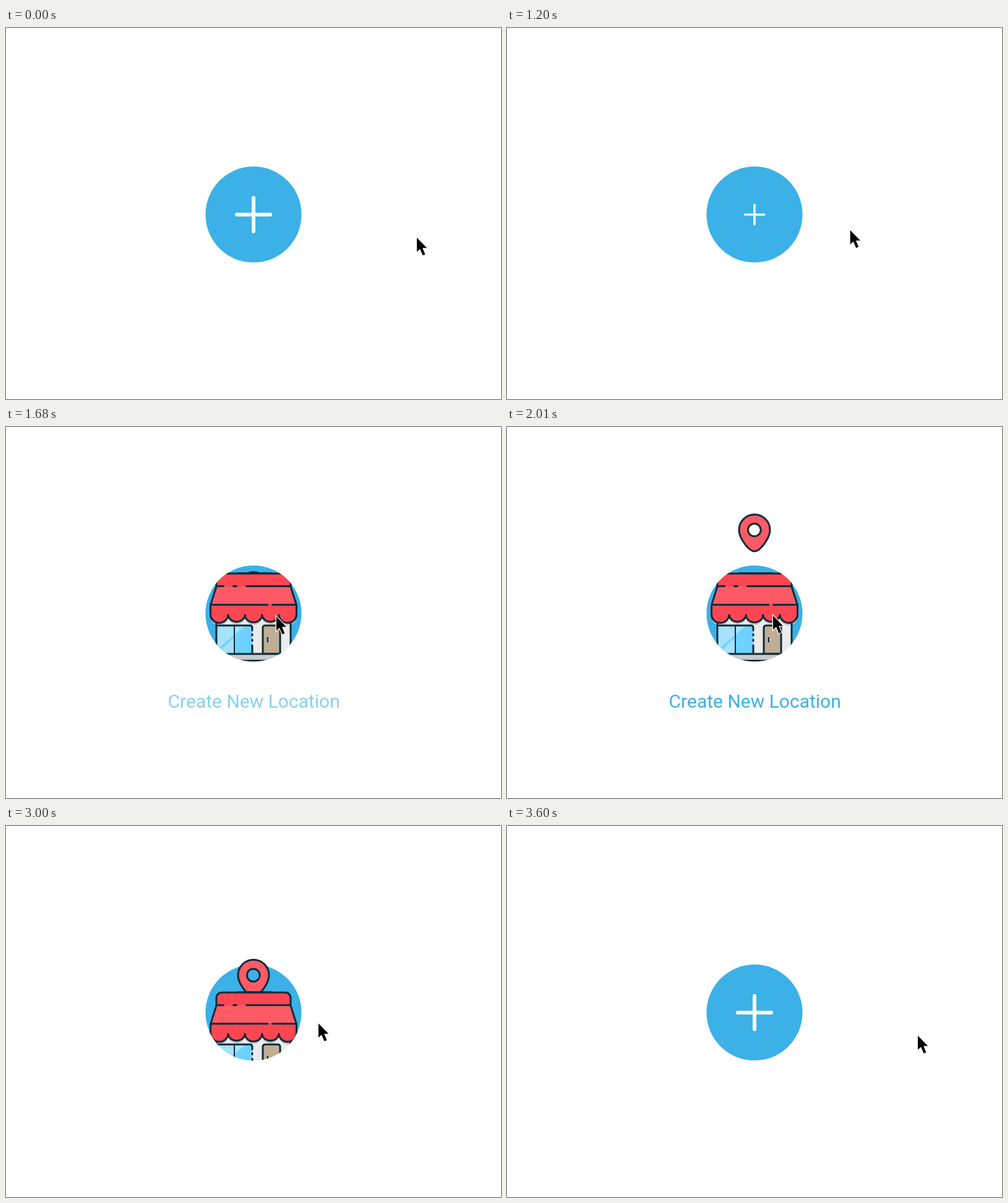
An HTML page for the animation above (4.5 s loop, 800 by 600 pixels).

```html
<!DOCTYPE html>
<html lang="en">
<head>
<meta charset="utf-8">
<title>Create New Location</title>
<style>
html, body { margin: 0; width: 100%; height: 100%; overflow: hidden; background: #fff; }
svg { display: block; width: 100vw; height: 100vh; }
.ink { stroke: #0c2b3a; stroke-width: 3; stroke-linejoin: round; }
.line { fill: none; stroke-linecap: round; }
text { font: 30px Roboto, Arial, sans-serif; fill: #3bb1e6; text-anchor: middle; }
</style>
</head>
<body>
<svg viewBox="0 0 800 600">
  <defs>
    <clipPath id="disc"><circle cx="400" cy="301.7" r="77.7"/></clipPath>
    <clipPath id="pinArea"><path d="M300 0H500V301.7H477.7A77.7 77.7 0 0 1 322.3 301.7H300Z"/></clipPath>
    <clipPath id="glass"><path d="M340 321H394Q398 321 398 325V367H340Z"/></clipPath>
    <path id="awning" d="M340 258V247Q340 237 350 237H450Q460 237 460 247V258L469.5 288V302
      a14 13.5 0 0 1 -28.5 2a13.7 12 0 0 1 -27.3 0a13.7 12 0 0 1 -27.4 0a13.7 12 0 0 1 -27.3 0a14 13.5 0 0 1 -28.5 -2V288Z"/>
  </defs>

  <circle cx="400" cy="301.7" r="77.6" fill="#3bb1e7"/>
  <path id="plus" d="M-27 0H27M0 -27V27" stroke="#fff" stroke-width="6" stroke-linecap="round"/>

  <g clip-path="url(#pinArea)">
    <g id="pin">
      <path class="ink" fill="#ff5a66" fill-rule="evenodd" d="M375 171.5A25 25 0 0 1 425 171.5C425 185 409 206 400 206C391 206 375 185 375 171.5Z
        M389.5 171.5a10.3 10.3 0 1 0 20.6 0a10.3 10.3 0 1 0 -20.6 0Z"/>
    </g>
  </g>

  <g clip-path="url(#disc)">
    <g id="shop">
      <path d="M340 290H460V390H340Z" fill="#ebebeb"/>
      <use href="#awning" y="4" fill="#c3c6c8"/>
      <g clip-path="url(#glass)">
        <path d="M340 321H398V367H340Z" fill="#6dd2ff"/>
        <path d="M340 321H387L340 361ZM340 367L369 340V357L357 367ZM369 357V367H358Z" fill="#a6e2fc"/>
      </g>
      <path class="ink line" d="M341 321H394Q398 321 398 325V329M398 335V337M398 344V346M398 353V367"/>
      <path class="ink line" d="M369 322V367" style="stroke-width:2"/>
      <path class="ink" d="M415 367V325Q415 321 419 321H439Q443 321 443 325V367Z" fill="#bfae94"/>
      <path class="ink line" d="M423 341V347" style="stroke-width:2.6"/>
      <path d="M425 342V346" stroke="#fff" stroke-width="1"/>
      <path class="ink line" d="M340 306V367M460 306V367"/>
      <path d="M320 367H480V377H320Z" fill="#c9cbcc"/>
      <path class="ink line" d="M320 367H480M320 378H480"/>
      <use href="#awning" fill="#ff4754"/>
      <path d="M340 258H460L469.5 287H330.5Z" fill="#ff5a66"/>
      <use href="#awning" class="ink" fill="none"/>
      <path class="ink line" d="M340 257.5H351.5M367.5 257.5H372.5M388.5 257.5H460M331 287.5H423M430.5 287.5H469"/>
      <path class="ink line" d="M375 236.5H429"/>
    </g>
  </g>

  <text id="label" x="400.7" y="454">Create New Location</text>
  <path id="cursor" d="M0 0V23L5 18.3L9.5 28.8L13.5 27.2L9.2 16.8H16.2Z" stroke="#fff" stroke-width="2.4" paint-order="stroke"/>
</svg>
<script>
const LOOP = 4500, STEP = 30;
const el = id => document.getElementById(id);
const [plus, pin, shop, label, cursor] = ['plus', 'pin', 'shop', 'label', 'cursor'].map(el);

const progress = (t, start, end) => Math.min(1, Math.max(0, (t - start) / (end - start)));
const smooth = p => p * p * (3 - 2 * p);
const ease = (t, start, end) => smooth(progress(t, start, end));

// Cubic easing with handles at (x1, 0) and (x2, 1).
function bezier(p, x1, x2) {
  let low = 0, high = 1;
  for (let i = 0; i < 24; i++) {
    const s = (low + high) / 2, r = 1 - s;
    if (3 * s * r * r * x1 + 3 * s * s * r * x2 + s ** 3 < p) low = s;
    else high = s;
  }
  return smooth(low);
}

const move = (node, x, y, extra = '') => node.setAttribute('transform', `translate(${x} ${y})${extra}`);

function pinOffset(t) {
  if (t < 2400) return 240 - 245 * ease(t, 1218, 2014) + 5 * ease(t, 2014, 2070);
  return -11 * ease(t, 2710, 2820) + 251 * ease(t, 2820, 3295);
}

function draw(t) {
  const near = t < 2400
    ? bezier(progress(t, 780, 1780), 0.154, 0.7)
    : 1 - bezier(progress(t, 2700, 3600), 0.26, 0.62);
  move(cursor, 664 - 234 * near, 339 - 34 * (near - 0.45 * near * (1 - near)));

  const size = 1 - ease(t, 1080, 1350) + ease(t, 3330, 3600);
  move(plus, 400, 301.7, ` scale(${size})`);
  plus.style.display = size > 0.001 ? '' : 'none';

  move(shop, 0, 160 * (1 - ease(t, 1230, 1680) + ease(t, 2766, 3576)));
  move(pin, 0, pinOffset(t));
  pin.style.display = t >= 1440 && t < 3220 ? '' : 'none';
  label.style.opacity = progress(t, 1500, 1800) - progress(t, 2715, 2970);
}

const origin = performance.now();
function tick() {
  const t = (performance.now() - origin) % LOOP;
  draw(Math.floor(t / STEP) * STEP);
  requestAnimationFrame(tick);
}
tick();
</script>
</body>
</html>
```
